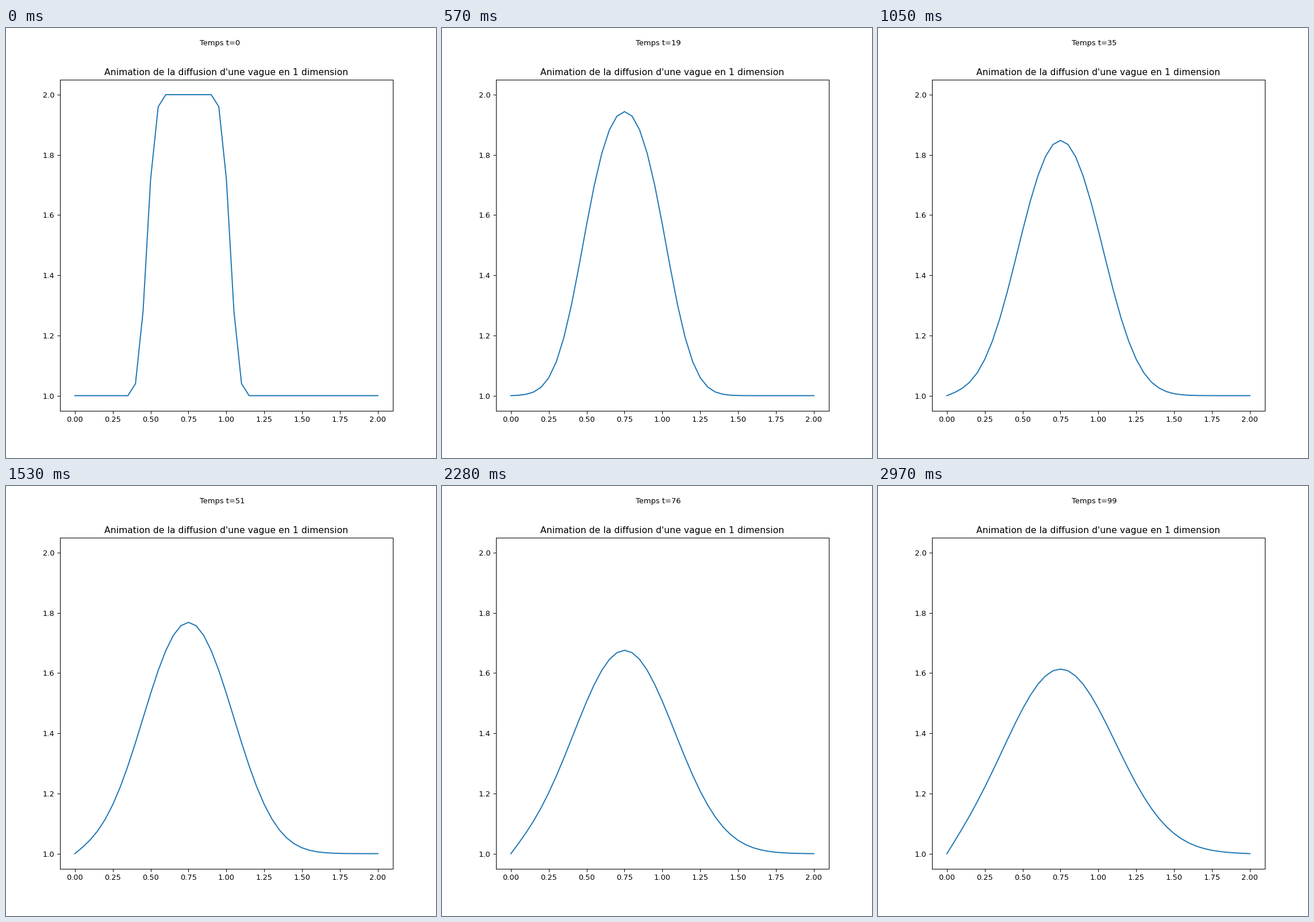
A matplotlib script that plays this animation: 748 by 748 pixels, repeating every 3000 ms.

```python
import numpy as np
import matplotlib.pyplot as plt
from matplotlib.animation import FuncAnimation

FRAMES = 100
INTERVAL = 30
POINTS = 41
R = 0.2  # diffusion number: nu * dt / dx**2

plt.rcParams["font.family"] = "DejaVu Sans"


def diffuse(u):
    """One explicit step with both ends held fixed."""
    new = u.copy()
    new[1:-1] += R * (u[2:] - 2 * u[1:-1] + u[:-2])
    return new


def solve():
    """Wave profile for every frame, starting two steps in."""
    u = np.ones(POINTS)
    u[10:21] = 2
    u = diffuse(diffuse(u))
    states = [u]
    for _ in range(FRAMES - 1):
        states.append(diffuse(states[-1]))
    return states


x = np.linspace(0, 2, POINTS)
waves = solve()

fig, ax = plt.subplots(figsize=(8, 8), dpi=93.5)
line, = ax.plot(x, waves[0])
ax.set_xlim(-0.1, 2.1)
ax.set_ylim(0.95, 2.05)
ax.set_title("Animation de la diffusion d'une vague en 1 dimension")
label = fig.text(0.45, 0.96, "")


def update(i):
    line.set_ydata(waves[i])
    label.set_text(f"Temps t={i}")
    return line, label


anim = FuncAnimation(fig, update, frames=FRAMES, interval=INTERVAL,
                     repeat=True, repeat_delay=0)
plt.show()
```
